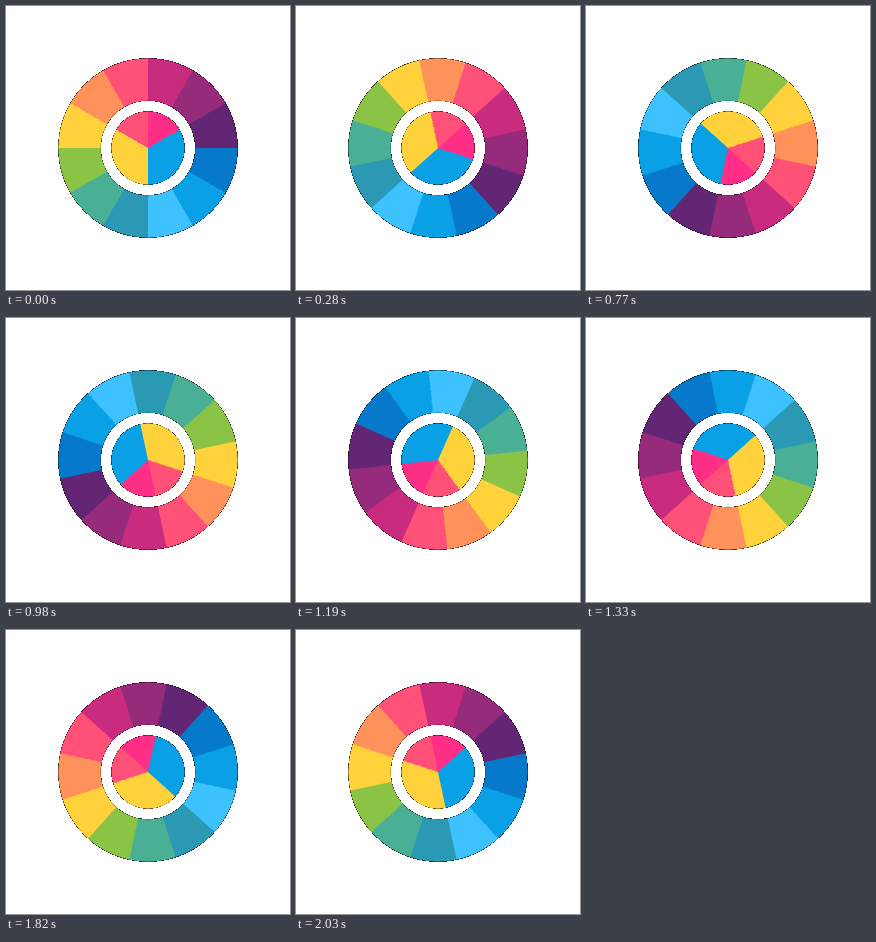
An HTML page that plays this animation: 284 px wide and 284 px high, repeating every 2.1 s.

```html
<!DOCTYPE html>
<html lang="en">
<head>
<meta charset="utf-8">
<title>Colour wheel</title>
<style>
  html, body { margin: 0; width: 100%; height: 100%; overflow: hidden; background: #fff; }
  svg { display: block; width: 100%; height: 100%; }
  .wheel { transform-origin: 0 0; animation: turn 2100ms steps(30) infinite; }
  .wheel, #mask { shape-rendering: crispEdges; }
  #rim, #mask { fill-rule: evenodd; }
  #mask { fill: #fff; }
  @keyframes turn { to { transform: rotate(360deg); } }
</style>
</head>
<body>
<svg viewBox="-142 -142 284 284">
  <g class="wheel">
    <g id="ring"></g>
    <g id="pie"></g>
  </g>
  <path id="rim"/>
  <path id="mask"/>
</svg>
<script>
  const ringColors = [
    '#c92c7f', '#962a7b', '#622674', '#0779cb', '#09a0e6', '#3dc1ff',
    '#2b99b3', '#49b095', '#8bc346', '#ffd23b', '#ff915a', '#ff5178'
  ];
  const pieColors = ['#ff2e87', '#09a0e6', '#09a0e6', '#ffd23b', '#ffd23b', '#ff5178'];
  const $ = id => document.getElementById(id);

  // Degrees run clockwise from the top.
  const point = (r, deg) => {
    const a = deg * Math.PI / 180;
    return `${r * Math.sin(a)} ${-r * Math.cos(a)}`;
  };

  const wedge = (r, from, to, color) =>
    `<path d="M0 0L${point(r, from)}A${r} ${r} 0 0 1 ${point(r, to)}Z" fill="${color}"/>`;

  function fillDisc(id, r, colors) {
    const step = 360 / colors.length;
    $(id).innerHTML = colors.map((color, i) =>
      wedge(r, i * step, (i + 1) * step, color)).join('');
  }

  const circle = r => `M0 ${-r}A${r} ${r} 0 0 1 0 ${r}A${r} ${r} 0 0 1 0 ${-r}Z`;

  // Everything around the ring and the pie, grown inwards by inset.
  const surround = inset =>
    'M-142-142H142V142H-142Z' + [90 - inset, 47 + inset, 37 - inset].map(circle).join('');

  fillDisc('ring', 92, ringColors);
  fillDisc('pie', 42, pieColors);

  // The soft black edge shows only where the hard white mask leaves it.
  $('rim').setAttribute('d', surround(.3));
  $('mask').setAttribute('d', surround(0));
</script>
</body>
</html>
```
